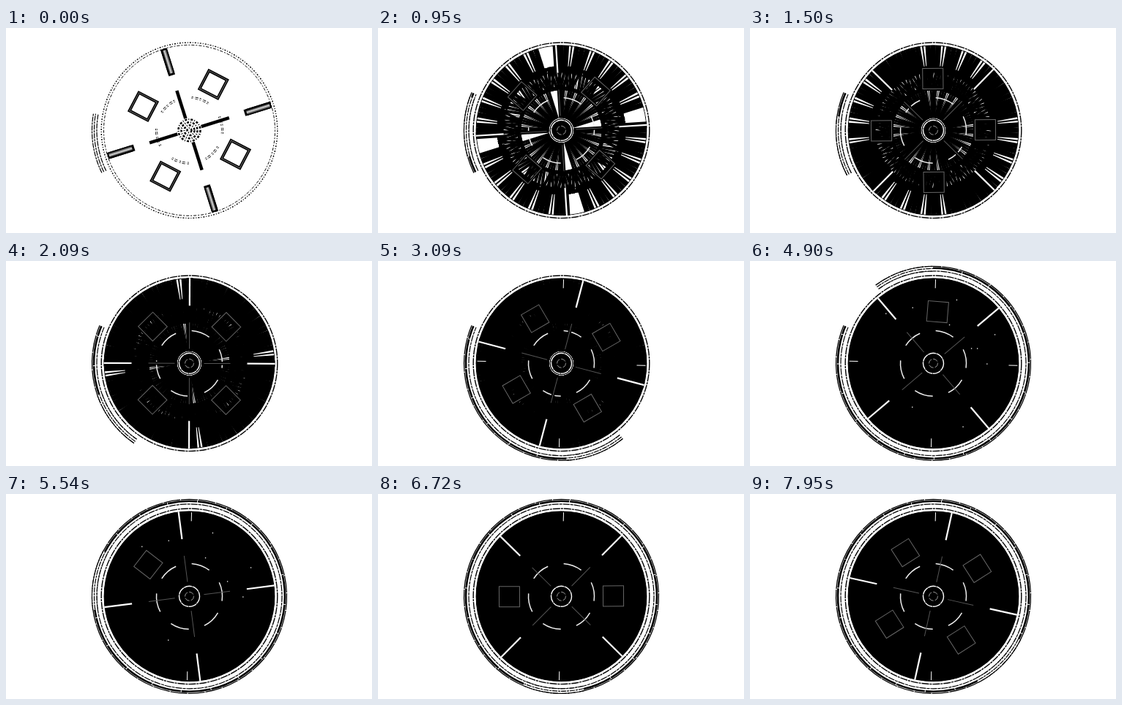
Animation, 500 px wide and 281 px high, one loop 8 s. Source, as an HTML page with a canvas:

```html
<!DOCTYPE html>
<html lang="en">
<head>
<meta charset="utf-8">
<title>Rotating dial</title>
<style>
  html, body { margin: 0; width: 100%; height: 100%; overflow: hidden; background: #fff; }
  canvas { display: block; width: 100vw; height: 100vh; }
</style>
</head>
<body>
<canvas id="stage" width="500" height="281"></canvas>
<script>
const ctx = document.getElementById('stage').getContext('2d');
const STEPS = 176, STEP = 8 / STEPS; // seconds
const RAD = Math.PI / 180;
const CX = 250.5, CY = 140.3;

function ease(u) {
  u = Math.min(1, Math.max(0, u));
  return u * u * (3 - 2 * u);
}

// Angles in degrees, clockwise from the right; both parts turn counter-clockwise
const rotorAngle = t => -17.5 - 77.6 * t - 2.1 * Math.sin(1.5 * t) - 74 * ease((t - 4.95) / 3);
const orbitHead = t => 154 + 11 * ease(t / 0.7) - 500 * ease((t - 0.8) / 7.4);

function seededRandom(seed) {
  return () => (seed = seed * 16807 % 2147483647) / 2147483647;
}

const random = seededRandom(41);
const specks = Array.from({ length: 18 }, () => ({
  angle: random() * 2 * Math.PI, radius: 55 + 45 * random(), until: 4 + 2.5 * random(),
}));

function arc(radius, from, to, width, color, dash = []) {
  ctx.beginPath();
  ctx.arc(0, 0, radius, from * RAD, to * RAD);
  ctx.lineWidth = width;
  ctx.strokeStyle = color;
  ctx.setLineDash(dash);
  ctx.stroke();
  ctx.setLineDash([]);
}

const circle = (radius, width, color, dash) => arc(radius, 0, 360, width, color, dash);

function disc(radius, color) {
  ctx.beginPath();
  ctx.arc(0, 0, radius, 0, 7);
  ctx.fillStyle = color;
  ctx.fill();
}

function bar(from, to, width, color) {
  ctx.fillStyle = color;
  ctx.fillRect(from, -width / 2, to - from, width);
}

function square(width, color) {
  ctx.lineWidth = width;
  ctx.strokeStyle = color;
  ctx.strokeRect(57, -14, 28, 28);
}

function fourTimes(angle, draw) {
  for (let k = 0; k < 4; k++) {
    ctx.save();
    ctx.rotate((angle + 90 * k) * RAD);
    draw(k);
    ctx.restore();
  }
}

// Black marks left by one position of the rotor
function stamp(angle, tick, spoke, frame) {
  fourTimes(angle, () => {
    bar(79, 117, tick, '#000');
    bar(17, 57, spoke, '#000');
  });
  fourTimes(angle + 45, () => square(frame, '#000'));
}

// Squares drop out in three equal beats
function squareVisible(k, t) {
  const hidden = ['1', '012', '13'][Math.floor((t - 3.6) / 1.25)] || '';
  return !hidden.includes(k);
}

function drawOrbit(t) {
  const head = orbitHead(t), tail = head + 36;
  const start = t < 0.7 ? tail : 203;
  const end = Math.max(Math.min(154, head), start - 360);
  if (t > 0.3) {
    arc(130.5, end, start, 2.6, '#000', [40, 1]);
    arc(133, end, start, 1.3, '#000', [23, 1]);
    arc(126.5, end, start, 1.2, '#000', [9, 1, 4, 1]);
  }
  arc(129.5, head, tail, 6, '#fff');
  for (const r of [126.5, 130, 133]) arc(r, head, tail, 1.2, '#000', [7, 1, 3, 1]);
}

// Every fourth position leaves only a faint mark
function drawTrail(count) {
  if (count > 72) return disc(117, '#000');
  for (let i = 0; i < count; i++) {
    if (i % 4 === 2) stamp(rotorAngle(i * STEP), 2, 1, 1);
    else stamp(rotorAngle(i * STEP), 7.2, 3.4, 4);
  }
}

function drawRotor(t) {
  const angle = rotorAngle(t), fresh = t < 0.06;
  const shine = ctx.createLinearGradient(0, -4.5, 0, 4.5);
  shine.addColorStop(0.2, '#000');
  shine.addColorStop(0.5, '#ddd');
  shine.addColorStop(0.9, '#000');
  if (t < 3.3) stamp(angle, 9, 4.5, 4);
  fourTimes(angle, () => {
    if (fresh) return bar(82, 115, 9, shine);
    bar(79, 117, 2.2, '#fff');
    bar(20, 56, 1, '#555');
  });
  fourTimes(angle + 45, k => { if (squareVisible(k, t)) square(1, '#666'); });
}

function drawRim(t) {
  circle(120.3, 1.4, '#000', t < 0.3 ? [2, 2, 1, 2] : [10, 1, 3, 1]);
  if (t < 0.3) return circle(117, 1, '#000', [2, 2, 4, 2]);
  circle(116.5, 1, '#000');
  circle(118, 2, '#fff');
}

function drawDashes(t) {
  for (let k = 0; k < 6; k++) {
    const from = 30 + 61 * k;
    if (t < 0.3) arc(45, from, from + 33, 3, '#000', [2, 3, 4, 2]);
    arc(45, from, from + 33, 1.5, '#eee');
  }
}

function drawHub(t) {
  if (t < 0.4) {
    for (let r = 3; r < 16; r += 4) circle(r, 2.5, '#000', [3, 2, 1, 2]);
    return;
  }
  disc(16, '#000');
  circle(14, 1.4, '#fff', [11, 0.6]);
  circle(6, 1, '#999', [7, 2]);
}

function drawSpecks(t) {
  if (t > 2) fourTimes(1.5, k => { if (k % 2 || t < 5) bar(103, 115, 1, '#fff'); });
  if (t < 3.2) return;
  ctx.fillStyle = '#fff';
  for (const { angle, radius, until } of specks) {
    if (t < until) ctx.fillRect(radius * Math.cos(angle), radius * Math.sin(angle), 1.3, 1.3);
  }
}

function draw(seconds) {
  const count = Math.floor((seconds + 0.012) / STEP) % STEPS;
  const t = count * STEP;
  ctx.fillStyle = '#fff';
  ctx.fillRect(0, 0, 500, 281);
  ctx.save();
  ctx.translate(CX, CY);
  drawOrbit(t);
  drawTrail(count);
  drawRim(t);
  drawDashes(t);
  drawSpecks(t);
  drawRotor(t);
  drawHub(t);
  ctx.restore();
}

const origin = performance.now();
function tick() {
  draw((performance.now() - origin) / 1000);
  requestAnimationFrame(tick);
}
tick();
</script>
</body>
</html>
```
